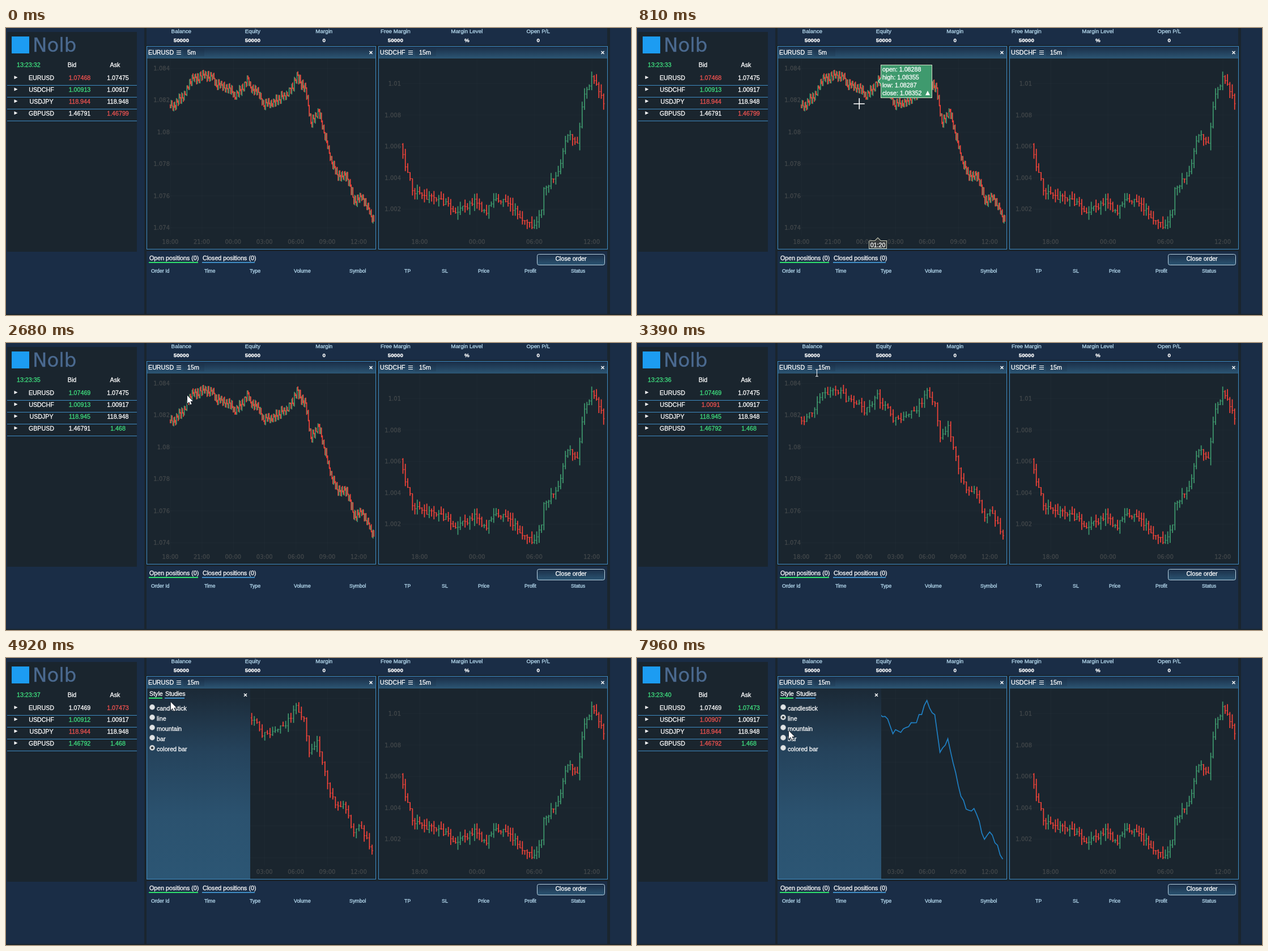
Recreate the animation shown at these times as an HTML page with a canvas. Size 1103x508 px, loop 8 s.

```html
<!DOCTYPE html>
<html lang="en">
<head>
<meta charset="utf-8">
<title>Trading dashboard</title>
<style>
html, body { margin: 0; width: 100%; height: 100%; overflow: hidden; background: #1a252e; }
canvas { display: block; }
</style>
</head>
<body>
<canvas id="stage" width="1103" height="508"></canvas>
<script>
const ctx = document.getElementById('stage').getContext('2d');
const LOOP = 8000;
const NAVY = '#1a2d46', DARK = '#1a252e', STEEL = '#2c5674', BLUE = '#3f8cc4', LIME = '#2ee06d';
const GREEN = '#3f9a6e', RED = '#f4443a', WHITE = '#fff', PALE = '#b5d9ee', DIM = '#42474a';
const SANS = '"Liberation Sans", Arial, sans-serif', AXIS = '10px "DejaVu Sans", sans-serif';
const UI = '10.7px ' + SANS;

// Moments at which the interface changes
const T = { listOpen: 1770, listClose: 2680, coarse: 3000, menu: 4460, candle: 5900, line: 6700, rescale: 7960 };
const SECONDS = [180, 1150, 2680, 3200, 4460, 5310, 6600, 7400];

// Starting prices in points, with the direction of the last move
const MARKET = {
  EURUSD: { unit: 1e5, bid: [107468, -1], ask: [107475, 0] },
  USDCHF: { unit: 1e5, bid: [100913, 1], ask: [100917, 0] },
  USDJPY: { unit: 1e3, bid: [118944, -1], ask: [118948, 0] },
  GBPUSD: { unit: 1e5, bid: [146791, 0], ask: [146799, -1] }
};
const MOVES = [
  [1400, 'USDJPY', 'bid', 1], [1400, 'GBPUSD', 'ask', 1], [1770, 'EURUSD', 'bid', 1], [3000, 'GBPUSD', 'bid', 1],
  [3200, 'USDCHF', 'bid', -3], [3690, 'USDJPY', 'bid', -1], [4460, 'EURUSD', 'bid', 0], [4460, 'EURUSD', 'ask', -2],
  [4460, 'USDCHF', 'bid', 2], [5310, 'GBPUSD', 'bid', 2], [5400, 'EURUSD', 'ask', -1], [5400, 'USDCHF', 'bid', -2],
  [5400, 'USDJPY', 'bid', 1], [7400, 'EURUSD', 'ask', 1], [7400, 'USDCHF', 'bid', -3], [7400, 'USDJPY', 'bid', -1],
  [7400, 'GBPUSD', 'bid', -2]
];

// Pointer path: [time, x, y]
const PATH = [[340, 547, 506], [810, 392, 134], [1060, 335, 66], [1540, 326, 46], [1990, 326, 46], [2530, 320, 93],
  [2850, 320, 93], [3390, 317, 53], [3770, 304, 47], [4760, 302, 47], [4920, 291, 78], [5090, 262, 84],
  [5770, 262, 84], [6480, 273, 105], [7120, 262, 106], [7960, 268, 129]];

// Turning points of the two trends: [bar, height on the stage]
const EUR_TREND = [[0, 138], [4, 124], [8, 88], [15, 84], [17, 103], [22, 106], [24, 124], [28, 97], [29, 90], [30, 106],
  [33, 114], [35, 138], [39, 130], [44, 120], [48, 84], [51, 107], [53, 168], [56, 146], [60, 222], [63, 260], [66, 259],
  [70, 309], [72, 297], [77, 341]];
const CHF_TREND = [[0, 224], [4, 288], [14, 304], [23, 326], [30, 303], [35, 328], [38, 304], [45, 312], [54, 353],
  [58, 322], [59, 284], [65, 254], [69, 190], [73, 204], [76, 117], [79, 86], [84, 134]];

const noise = n => { const v = Math.sin(n * 127.1 + 3.7) * 43758.5; return v - Math.floor(v); };
const lerp = (a, b, k) => a + (b - a) * k;

// Piecewise linear interpolation of [key, ...values]
function along(keys, at) {
  const i = keys.findIndex(k => k[0] > at);
  if (i <= 0) return keys[i ? keys.length - 1 : 0].slice(1);
  const a = keys[i - 1], b = keys[i], k = (at - a[0]) / (b[0] - a[0]);
  return a.slice(1).map((v, n) => lerp(v, b[n + 1], k));
}
function closesOf(trend, jitter) {
  const keys = new Set(trend.map(k => k[0])), last = trend[trend.length - 1][0];
  return Array.from({ length: last + 1 }, (_, i) =>
    along(trend, i)[0] + (keys.has(i) ? 0 : (noise(i + 500) - 0.5) * jitter));
}
function makeBars(closes, first, wick) {
  return closes.map((close, i) => {
    const open = i ? closes[i - 1] : first;
    return {
      open, close,
      high: Math.max(74, Math.min(open, close) - wick * noise(i * 2)),
      low: Math.min(356, Math.max(open, close) + wick * noise(i * 2 + 1))
    };
  });
}
const eur15 = makeBars(closesOf(EUR_TREND, 10), 132, 11);
const chf15 = makeBars(closesOf(CHF_TREND, 13), 206, 13);
// Each 15 minute bar splits into three that dip, recover and settle
const eur5 = makeBars(eur15.flatMap((b, i) => {
  const swing = 5 + 4 * noise(i + 900);
  return [swing, -swing, 0].map((s, k) => lerp(b.open, b.close, (k + 1) / 3) + s);
}), 136, 3);

function rect(x, y, w, h, fill) {
  ctx.fillStyle = fill;
  ctx.fillRect(x, y, w, h);
}
function text(str, x, y, fill = WHITE, align = 'left', font = UI) {
  ctx.font = font;
  ctx.textAlign = align;
  ctx.fillStyle = ctx.strokeStyle = fill;
  ctx.lineWidth = 0.3;
  ctx.fillText(str, x, y);
  ctx.strokeText(str, x, y);
}
function stroke(points, color, width) {
  ctx.beginPath();
  points.forEach(([x, y]) => ctx.lineTo(x, y));
  ctx.strokeStyle = color;
  ctx.lineWidth = width;
  ctx.stroke();
}
function shape(points, fill, edge) {
  if (edge) stroke([...points, points[0]], edge, 2);
  ctx.beginPath();
  points.forEach(([x, y]) => ctx.lineTo(x, y));
  ctx.fillStyle = fill;
  ctx.fill();
}
function disc(x, y, r, fill) {
  ctx.beginPath();
  ctx.arc(x, y, r, 0, 7);
  ctx.fillStyle = fill;
  ctx.fill();
}
function gradient(y0, y1, ...colors) {
  const g = ctx.createLinearGradient(0, y0, 0, y1);
  colors.forEach((c, i) => g.addColorStop(i / (colors.length - 1), c));
  return g;
}
function cross(x, y) {
  for (const d of [-2.5, 2.5]) stroke([[x - 2.5, y - d], [x + 2.5, y + d]], WHITE, 1.4);
}
function tab(label, x, y, w, color) {
  text(label, x, y);
  rect(x - 1, y + 3, w, 2, color);
}

function drawSidebar(t) {
  rect(0, 0, 244, 506, NAVY);
  rect(2, 7, 229, 389, DARK);
  rect(10, 15, 31, 30, '#1c9cf2');
  text('Nolb', 47, 42, '#4b6a90', 'left', '34px "DejaVu Sans", sans-serif');
  text('13:23:' + (32 + SECONDS.filter(s => t >= s).length), 19, 69, '#3fe07f');
  text('Bid', 116.5, 69, WHITE, 'center');
  text('Ask', 192.5, 69, WHITE, 'center');
  Object.entries(MARKET).forEach(([symbol, quote], i) => {
    const y = 92 + 21 * i;
    shape([[14.5, y - 7.5], [20.5, y - 4.5], [14.5, y - 1.5]], WHITE);
    text(symbol, 62.5, y, WHITE, 'center');
    [['bid', 130], ['ask', 197.5]].forEach(([side, x]) => {
      let [points, direction] = quote[side];
      for (const [at, name, moved, delta] of MOVES) {
        if (t >= at && name === symbol && moved === side) {
          points += delta;
          direction = delta;
        }
      }
      const tint = direction > 0 ? '#3fe07f' : direction < 0 ? '#f0524f' : WHITE;
      text(String(points / quote.unit), x, y, tint, 'center');
    });
    rect(2, y + 9, 229, 1, BLUE);
  });
}

function drawAccount() {
  rect(248, 0, 813, 30, NAVY);
  rect(1066, 0, 37, 506, NAVY);
  const items = { Balance: 50000, Equity: 50000, Margin: 0, 'Free Margin': 50000, 'Margin Level': '%', 'Open P/L': 0 };
  Object.entries(items).forEach(([label, value], i) => {
    text(label, 309.3 + 126 * i, 9, PALE, 'center', '9.8px ' + SANS);
    text(value, 309.3 + 126 * i, 25, WHITE, 'center', 'bold 9.8px ' + SANS);
  });
}

function drawOrders() {
  rect(248, 395, 813, 111, NAVY);
  tab('Open positions (0)', 253, 411, 87, LIME);
  tab('Closed positions (0)', 347, 411, 93, BLUE);
  ctx.beginPath();
  ctx.roundRect(937.5, 400.5, 119, 19, 3);
  ctx.fillStyle = gradient(400, 420, NAVY, STEEL);
  ctx.fill();
  ctx.strokeStyle = '#b9d3e2';
  ctx.lineWidth = 1;
  ctx.stroke();
  text('Close order', 997, 412, WHITE, 'center');
  const columns = { 'Order Id': 256, Time: 350, Type: 430, Volume: 508, Symbol: 606, TP: 703, SL: 769, Price: 833, Profit: 915, Status: 997 };
  for (const label in columns) text(label, columns[label], 433, PALE, 'left', '8.9px ' + SANS);
}

function drawFrame(x, symbol, period) {
  rect(x, 33, 404, 358, DARK);
  rect(x, 33, 404, 21, gradient(33, 54, NAVY, STEEL));
  rect(x + 65, 36, 37, 14, 'rgba(24,42,64,.18)');
  text(symbol, x + 3, 47);
  for (let i = 0; i < 3; i++) rect(x + 53, 40 + i * 3, 8, 1, WHITE);
  text(period, x + 72, 47);
  cross(x + 396, 43.5);
}
function drawBorder(x) {
  ctx.strokeStyle = BLUE;
  ctx.lineWidth = 1;
  ctx.strokeRect(x + 0.5, 32.5, 404, 359);
}
function drawAxes(left, x0, dx, hours, count, price, y0, dy, rows) {
  const faint = 'rgba(255,255,255,.018)';
  for (let i = 0; i < count; i++) {
    const hour = (18 + hours * i) % 24;
    rect(x0 + dx * i, 55, 1, 312, faint);
    text(String(hour).padStart(2, '0') + ':00', x0 + dx * i, 382, DIM, 'center', AXIS);
  }
  for (let i = 0; i < rows; i++) {
    rect(left, y0 + dy * i, 355, 1, faint);
    text(+(price - 0.002 * i).toFixed(3), left - 1, y0 + dy * i + 4, DIM, 'right', AXIS);
  }
}
function drawBars(bars, x0, step, candles) {
  const tick = Math.min(1.8, step * 0.5);
  bars.forEach((b, i) => {
    const x = x0 + step * i;
    ctx.fillStyle = b.close <= b.open ? GREEN : RED;
    ctx.fillRect(x - 0.85, b.high, 1.7, b.low - b.high);
    if (candles) {
      ctx.fillRect(x - 1.5, Math.min(b.open, b.close), 3, Math.abs(b.open - b.close));
    } else {
      ctx.fillRect(x - tick, b.open - 0.6, tick, 1.2);
      ctx.fillRect(x, b.close - 0.6, tick, 1.2);
    }
  });
}

function drawCharts(t) {
  drawFrame(248, 'EURUSD', t < T.listClose ? '5m' : '15m');
  drawAxes(290, 290, 55.4, 3, 7, 1.084, 71, 56.4, 6);
  if (t < T.coarse) drawBars(eur5, 290, 1.542, false);
  else if (t < T.line) drawBars(eur15, 290.5, 4.617, t >= T.candle);
  else {
    const fit = y => t < T.rescale ? y : 74 + (y - 83) * 1.093;
    stroke(eur15.map((b, i) => [290 + 4.617 * i, fit(b.close)]), '#1f80c4', 1.7);
  }
  if (t >= T.menu) drawMenu(t);
  drawBorder(248);

  drawFrame(657, 'USDCHF', '15m');
  drawAxes(698, 730, 101.2, 6, 4, 1.01, 98, 55.5, 5);
  drawBars(chf15, 700.5, 4.217, false);
  drawBorder(657);
}

function drawMenu(t) {
  rect(249, 54, 182, 337, gradient(54, 391, '#1b2936', '#25435c', '#2b526f', '#2c5674'));
  tab('Style', 253, 67, 24, LIME);
  tab('Studies', 281, 67, 35, BLUE);
  cross(422.5, 65.5);
  const chosen = t >= T.line ? 1 : t >= T.candle ? 0 : 4;
  ['candlestick', 'line', 'mountain', 'bar', 'colored bar'].forEach((label, i) => {
    const y = 87 + 18 * i;
    disc(258, y, 5, '#8c9499');
    disc(258, y, 4.4, '#dfe3e5');
    if (i === chosen) disc(258, y, 2.3, '#3a4247');
    text(label, 266, y + 5.5);
  });
}

function drawPeriodList(t) {
  if (t < T.listOpen || t >= T.listClose) return;
  const y = along(PATH, t)[1];
  rect(314, 54, 35, 86, DARK);
  ['1m', '5m', '15m', '30m', '1h', '4h'].forEach((label, i) => {
    const top = 54 + i * 14.3;
    if (y >= top && y < top + 14.3) rect(314, top, 35, 14.3, STEEL);
    text(label, 318, top + 11);
  });
}

function drawTooltip(t) {
  // The tooltip trails the pointer in short steps
  const [px, py] = along(PATH, Math.floor((t + 5) / 90) * 90 - 100);
  if (t < 440 || t >= 1150 || py > 391) return;
  const i = Math.round((px - 290) / 1.542), b = eur5[i], up = b.close <= b.open;
  const x = Math.floor(290 + 1.542 * i), y = Math.round((b.open + b.close) / 2);
  shape([[x + 1, y], [x + 6, y - 5], [x + 6, y - 28], [x + 95, y - 28], [x + 95, y + 29], [x + 6, y + 29], [x + 6, y + 5]],
    up ? GREEN : RED, '#d3dfc6');
  ['open', 'high', 'low', 'close'].forEach((key, n) =>
    text(key + ': ' + (1.084 - (b[key] - 71) / 28200).toFixed(5), x + 8, y - 17 + n * 14));
  const ay = y + 21, s = up ? 1 : -1;
  shape([[x + 84, ay + 4 * s], [x + 92, ay + 4 * s], [x + 88, ay - 4 * s]], WHITE);

  shape([[x - 15, 377], [x - 5, 377], [x, 372], [x + 5, 377], [x + 15, 377], [x + 15, 390], [x - 15, 390]],
    '#34383a', '#cbcdb8');
  const minutes = 18 * 60 + i * 5, pad = n => String(n).padStart(2, '0');
  text(pad(Math.floor(minutes / 60) % 24) + ':' + pad(minutes % 60), x, 388, WHITE, 'center');
}

function drawPointer(t) {
  if (t < PATH[0][0]) return;
  const [x, y] = along(PATH, t);
  if (t < 1150 && y > 54 && y < 391) {
    stroke([[x - 9.5, y + 0.5], [x + 10, y + 0.5]], WHITE, 1.6);
    stroke([[x + 0.5, y - 9.5], [x + 0.5, y + 10]], WHITE, 1.6);
  } else if (t >= 3200 && t < 3690) {
    stroke([[x + 0.5, y - 6], [x + 0.5, y + 6]], WHITE, 1);
    for (const dy of [-6, 6]) stroke([[x - 2, y + dy], [x + 3, y + dy]], WHITE, 1);
  } else {
    const arrow = [[0, 0], [0, 14], [3.2, 11], [5.4, 16], [7.6, 15], [5.4, 10.2], [9.8, 10]];
    shape(arrow.map(([a, b]) => [x + a, y + b]), WHITE, '#1b2430');
  }
}

function draw() {
  const t = performance.now() % LOOP;
  rect(0, 0, 1103, 508, DARK);
  drawSidebar(t);
  drawAccount();
  drawOrders();
  drawCharts(t);
  drawPeriodList(t);
  drawTooltip(t);
  drawPointer(t);
  requestAnimationFrame(draw);
}
draw();
</script>
</body>
</html>
```
